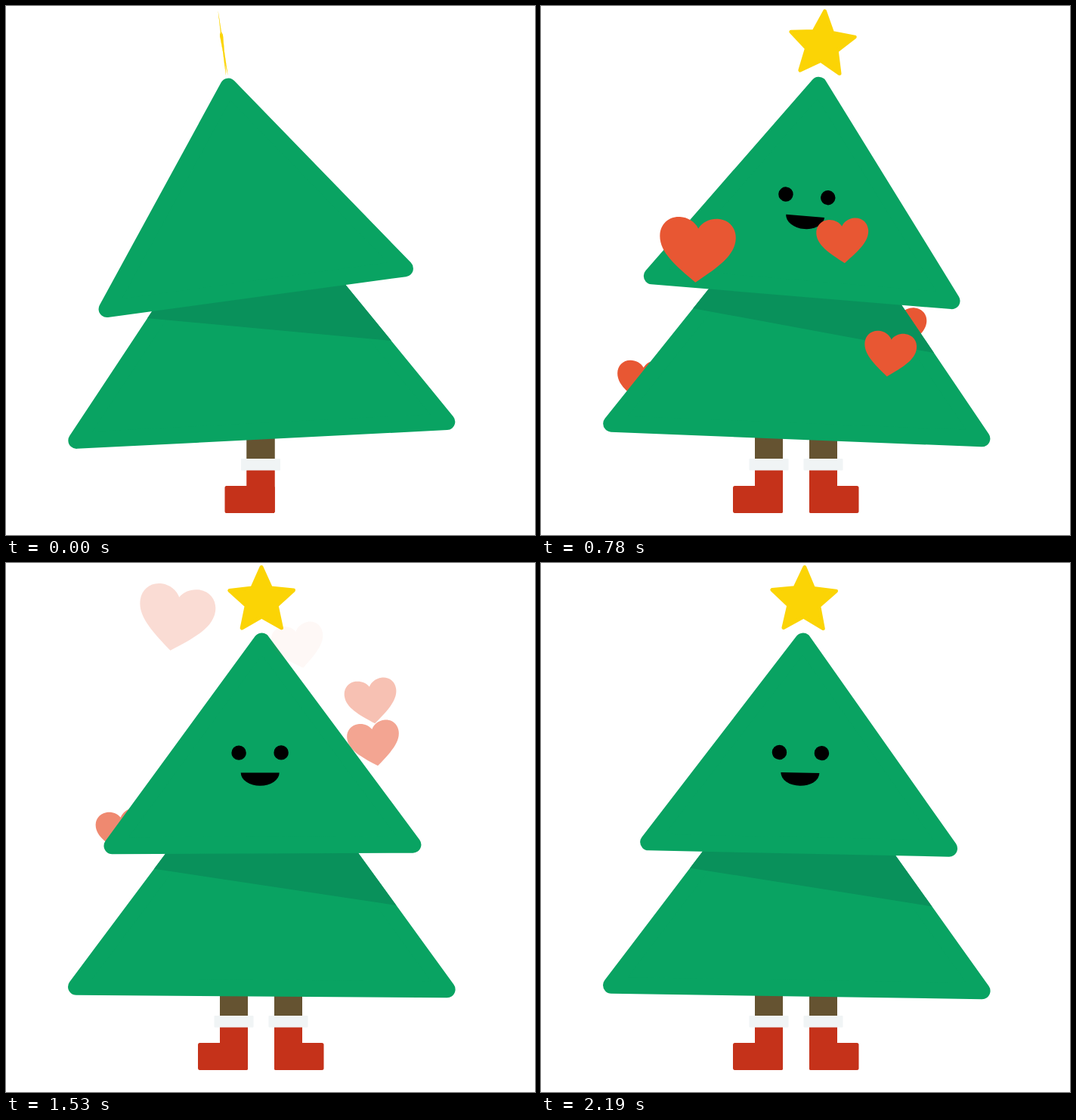
Write an HTML page that moves like this. It is 700x700 px and loops after 2.22 s.

```html
<!DOCTYPE html>
<html lang="en">
<head>
<meta charset="utf-8">
<title>Dancing tree</title>
<style>
  html, body { margin: 0; width: 100%; height: 100%; overflow: hidden; background: #fff; }
  svg { display: block; width: 100vw; height: 100vh; }
  .green { fill: #09a362; stroke: #09a362; stroke-width: 22; stroke-linejoin: round; }
  .star { fill: #fbd405; stroke: #fbd405; stroke-width: 5; stroke-linejoin: round; }
  .heart { fill: #e85733; }
  .trunk { fill: #655331; }
  .boot { fill: #c5321a; }
  .cuff { fill: #f0f4f5; }
</style>
</head>
<body>
<svg viewBox="0 0 700 700">
  <defs>
    <path id="heart" d="M0-28.5C-5-37.5-15-42.5-25-42.5C-40-42.5-50-31.5-50-17.5C-50 4.5-28 21.5 0 42.5C28 21.5 50 4.5 50-17.5C50-31.5 40-42.5 25-42.5C15-42.5 5-37.5 0-28.5Z"/>
    <path id="skirt" d="M0-332.5L245.3 .5H-245.3Z"/>
    <path id="crown" d="M0-336.5L199-66.5H-199Z"/>
    <clipPath id="inSkirt"><path d="M0-351L256-3.5V12H-256V-3.5Z"/></clipPath>
    <clipPath id="inCrown"><path d="M0-355L210-70V-55H-210V-70Z"/></clipPath>
    <g id="leg">
      <rect class="trunk" x="-18.5" y="560" width="37" height="42"/>
      <rect class="boot" x="-18.5" y="612" width="37" height="59" rx="2"/>
      <rect class="cuff" x="-26" y="599" width="52" height="15.5" rx="1"/>
    </g>
  </defs>
  <g id="leftLeg"><use href="#leg"/><rect class="boot" x="-47.5" y="635" width="66" height="36" rx="2.5"/></g>
  <g id="rightLeg"><use href="#leg"/><rect id="toe" class="boot" y="635" height="36" rx="2.5"/></g>
  <g id="back"></g>
  <g id="lower">
    <use href="#skirt" class="green"/>
    <path clip-path="url(#inSkirt)" fill="#09915b" d="M-204.4-165L241.4-101V-288H-204.4Z"/>
  </g>
  <g id="upper">
    <use href="#crown" class="green"/>
    <path id="star" class="star"/>
    <g clip-path="url(#inCrown)">
      <g id="face">
        <circle cx="-28" cy="-189" r="9.7"/>
        <circle cx="28" cy="-189" r="9.7"/>
        <path d="M-25.5-162.5A25.5 17.3 0 0 0 25.5-162.5Z"/>
      </g>
    </g>
  </g>
  <g id="front"></g>
</svg>
<script>
const LOOP = 2220, STEP = 30, HOLD = 150, SPIN = 470;
const $ = id => document.getElementById(id);
const move = (el, value) => el.setAttribute('transform', value);
const clamp = v => Math.min(1, Math.max(0, v));
const easeOut = (u, power) => 1 - (1 - clamp(u)) ** power;
const easeInOut = u => (1 - Math.cos(Math.PI * clamp(u))) / 2;

// Damped swing that passes its rest value at time zero, and again every half period.
const swing = (t, { rest, size, zero, half, decay }) =>
  rest + size * Math.exp(-decay * (t - zero)) * Math.sin(Math.PI * (t - zero) / half);

const crownTilt = { rest: 0.8, size: 9.15, zero: 325, half: 700, decay: 0.0016 };
const skirtTilt = { rest: 0.75, size: 4.3, zero: 305, half: 700, decay: 0.0018 };
const faceDrift = { rest: -1.5, size: -7.8, zero: 690, half: 1000, decay: 0.0012 };

// Each heart rises from y, sways around x, turns on the way up; they fade one after another.
const hearts = [
  { layer: 'front', size: 0.69, x: 390, y: 421.5, rise: 316, start: 200, life: 1440, sway: 15, peak: 1030, tilt: -0.5, turn: -11 },
  { layer: 'front', size: 1.005, x: 215, y: 447, rise: 436, start: 100, life: 1900, sway: -9.5, peak: 640, tilt: 0, turn: 11 },
  { layer: 'front', size: 0.69, x: 475, y: 514.7, rise: 356, start: 450, life: 1300, sway: -15, peak: 900, tilt: 10, turn: -20 },
  { layer: 'back', size: 0.69, x: 482, y: 447.5, rise: 232, start: 540, life: 1250, sway: -7.5, peak: 850, tilt: 7, turn: -18 },
  { layer: 'back', size: 0.69, x: 145, y: 510, rise: 245, start: 540, life: 1700, sway: -10, peak: 680, tilt: 1, turn: -16 }
];

hearts.forEach((h, i) => {
  h.fade = 1080 + 77 * i;
  h.el = document.createElementNS('http://www.w3.org/2000/svg', 'use');
  h.el.setAttribute('href', '#heart');
  h.el.setAttribute('class', 'heart');
  $(h.layer).append(h.el);
});

const points = Array.from({ length: 10 }, (_, i) => {
  const r = i % 2 ? 21 : 44.5, a = i * Math.PI / 5;
  return [r * Math.sin(a), -r * Math.cos(a)].map(v => v.toFixed(2)).join(' ');
});
$('star').setAttribute('d', 'M' + points.join('L') + 'Z');

function drawHeart(h, t) {
  const up = easeInOut((t - h.start) / h.life);
  const x = h.x + h.sway * Math.cos(2 * Math.PI * (t - h.peak) / 1800);
  const scale = h.size * easeOut((t - 300) / 210, 2);
  move(h.el, `translate(${x} ${h.y - h.rise * up}) rotate(${h.tilt + h.turn * up}) scale(${scale})`);
  h.el.setAttribute('opacity', 1 - clamp((t - h.fade) / 470));
}

// Turning from side view to front view spreads the legs and swings the right toe outwards.
function drawLegs(open) {
  const reach = 28.5 * (2 * open - 1);
  move($('leftLeg'), `translate(${337 - 35.5 * open} 0)`);
  move($('rightLeg'), `translate(${337 + 36.5 * open} 0)`);
  $('toe').setAttribute('x', -18.5 + Math.min(0, reach));
  $('toe').setAttribute('width', 37 + Math.abs(reach));
}

function draw(t) {
  const u = (t - HOLD) / SPIN, open = easeOut(u, 3);
  move($('lower'), `translate(338.3 562) rotate(${swing(t, skirtTilt)})`);
  move($('upper'), `translate(339.7 440) rotate(${swing(t, crownTilt)})`);
  move($('face'), `translate(${swing(t, faceDrift) - 200 * (1 - open)} 0)`);
  move($('star'), `translate(0 -390) scale(${0.045 + 0.955 * easeOut(u, 2)} 1)`);
  drawLegs(open);
  hearts.forEach(h => drawHeart(h, t));
}

const begin = performance.now();
function tick() {
  const t = (performance.now() - begin) % LOOP;
  draw(Math.max(HOLD, Math.floor(t / STEP) * STEP));
  requestAnimationFrame(tick);
}
tick();
</script>
</body>
</html>
```
